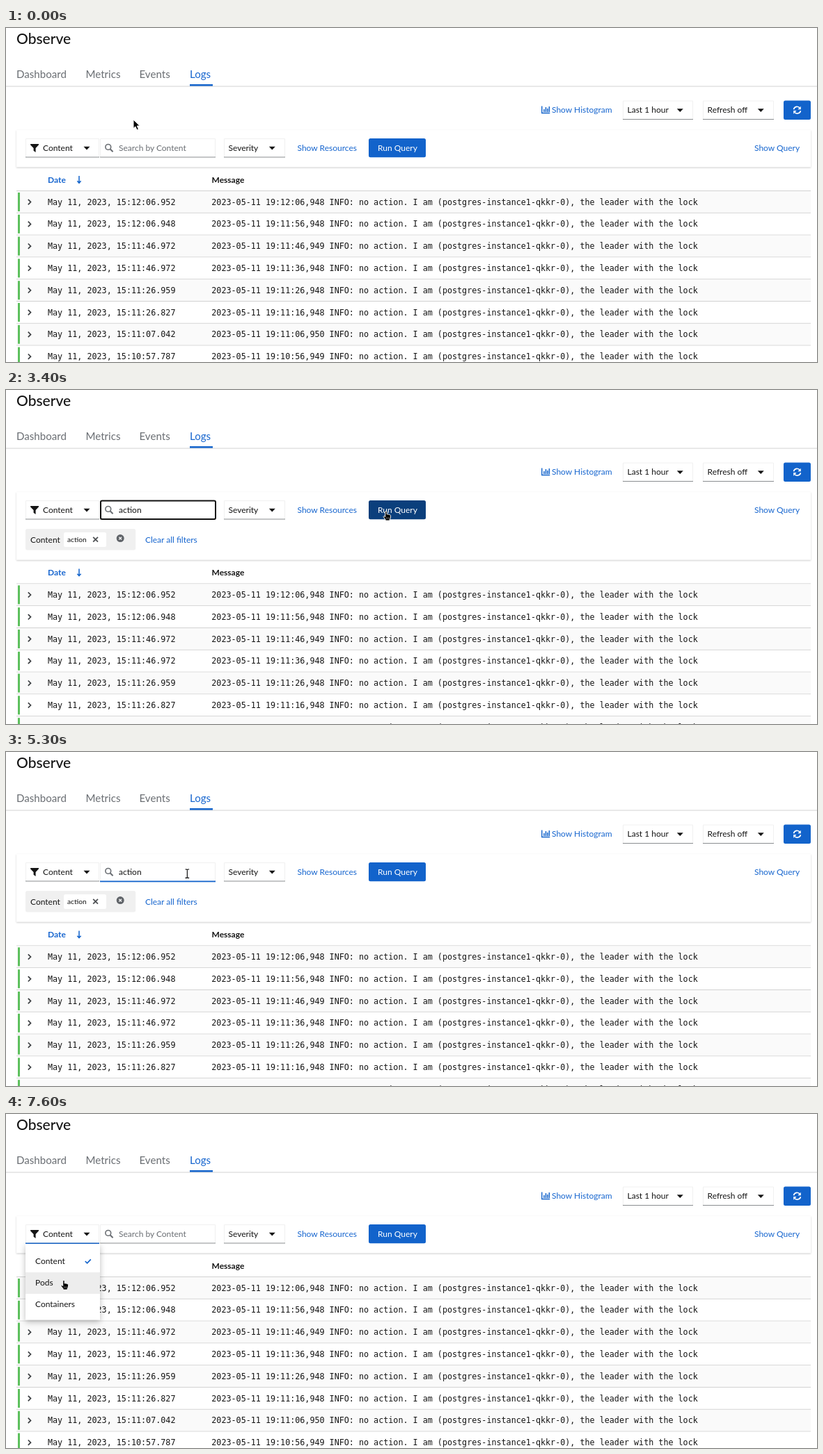
Write an HTML page that moves like this. It is 1165 px wide and 481 px high and loops after 8 s.

```html
<!DOCTYPE html>
<html lang="en">
<head>
<meta charset="utf-8">
<title>Observe logs</title>
<style>
  html, body { margin: 0; width: 100%; height: 100%; overflow: hidden; background: #fff; }
  svg { display: block; }
  text { font: 12px Lato, "Open Sans", sans-serif; fill: #151515; white-space: pre; }
  .mono { font: 11.73px "DejaVu Sans Mono", monospace; }
  .blue { fill: #1766cf; }
  .grey { fill: #6a6e73; }
  .white { fill: #fff; }
  .bold { font-weight: 700; }
  .small { font-size: 10.2px; }
  .tab { font-size: 15.1px; }
  .title { font-size: 21px; font-weight: 500; }
  .hover { fill: #0b3f7c; text-decoration: underline; }
  .panel { filter: drop-shadow(0 1px 1px #0003); }
  .menu { filter: drop-shadow(0 3px 4px #0004); }
</style>
</head>
<body>
<svg id="stage" width="1165" height="481"></svg>
<script>
const stage = document.getElementById('stage');
const pen = document.createElement('canvas').getContext('2d');
const LOOP = 8000, STEP = 100, ROW = 31.8;
const BLUE = '#1263cb', NAVY = '#0b3f7c';

// [date column time, message time]
const logs = [
  ['12:06.952', '12:06,948'], ['12:06.948', '11:56,948'],
  ['11:46.972', '11:46,949'], ['11:46.972', '11:36,948'],
  ['11:26.959', '11:26,948'], ['11:26.827', '11:16,948'],
  ['11:07.042', '11:06,950'], ['10:57.787', '10:56,949'],
];

// Pointer keys: time, x, y
const path = [
  [0, 183, 132], [700, 198, 163], [3000, 198, 163], [3300, 500, 171],
  [3400, 546, 175], [3700, 561, 173], [4800, 561, 173], [5000, 265, 163],
  [5100, 265, 163], [6000, 244, 218], [6100, 244, 218], [6600, 107, 173],
  [7000, 107, 173], [7600, 83, 240],
];

// Search text: time, value
const typing = [[0, ''], [1200, 'a'], [1300, 'ac'], [1500, 'act'], [1900, 'acti'],
  [2100, 'actio'], [2300, 'action'], [6200, '']];

const latest = (keys, t) => keys.filter(k => k[0] <= t).pop();
const within = (t, a, b) => t >= a && t < b;

function pointerAt(t) {
  const a = latest(path, t), b = path[path.indexOf(a) + 1];
  if (!b) return [a[1], a[2]];
  const k = (t - a[0]) / (b[0] - a[0]);
  return [a[1] + (b[1] - a[1]) * k, a[2] + (b[2] - a[2]) * k];
}

const rect = (x, y, w, h, fill, more = '') =>
  `<rect x="${x}" y="${y}" width="${w}" height="${h}" fill="${fill}" ${more}/>`;
const text = (x, y, s, cls = '') => `<text x="${x}" y="${y}" class="${cls}">${s}</text>`;
const line = (d, color, w = 1, more = '') =>
  `<path d="${d}" fill="none" stroke="${color}" stroke-width="${w}" ${more}/>`;
const shape = (d, fill = '#151515', more = '') => `<path d="${d}" fill="${fill}" ${more}/>`;
const move = (x, y, s) => `<g transform="translate(${x} ${y})">${s}</g>`;

const field = (x, y, w, base = '#8a8d90') =>
  line(`M${x + .5} ${y + 27}V${y + .5}H${x + w - .5}V${y + 27}`, '#f0f0f0') +
  rect(x, y + 26.5, w, base === BLUE ? 1.8 : 1, base);
const caretDown = (x, y) => shape(`M${x - 4.5} ${y - 2}h9l-4.5 4.7z`);
const select = (x, y, w, label, dx = 6.5) =>
  field(x, y, w) + text(x + dx, y + 17.8, label) + caretDown(x + w - 18.7, y + 13.8);
const cross = (x, y, r, color, w) =>
  line(`M${x - r} ${y - r}l${2 * r} ${2 * r}m0 ${-2 * r}l${-2 * r} ${2 * r}`, color, w);

function header() {
  return text(15, 23, 'Observe', 'title') +
    [[15, 'Dashboard'], [114.5, 'Metrics'], [191.5, 'Events']]
      .map(([x, s]) => text(x, 71.5, s, 'tab grey')).join('') +
    text(264, 71.5, 'Logs', 'tab blue') +
    rect(0, 83.5, 1165, 1, '#d2d2d2') + rect(264, 81, 33, 2.5, BLUE);
}

function rightSide() {
  const sync = line('M-5-1A5 5 0 0 1 4-2.7M5 1A5 5 0 0 1-4 2.7', '#fff', 1.6) +
    shape('M5.3-5.5v4.6H.9zM-5.3 5.5V.9h4.4z', '#fff');
  return line('M769.8 112.5v10h11.5', BLUE, 1.4) +
    line('M773 121v-4m2.5 4v-7m2.5 7v-5m2.4 5v-8', BLUE, 1.5) +
    text(784, 122.3, 'Show Histogram', 'blue') +
    select(886, 104.5, 101, 'Last 1 hour') + select(1001, 104.5, 102, 'Refresh off') +
    rect(1117, 104.5, 39, 27.5, BLUE, 'rx="2.5"') + move(1136.5, 118.2, sync) +
    text(1075, 176.8, 'Show Query', 'blue');
}

function toolbar(s) {
  const [x, y] = s.pointer;
  let out = field(28, 159, 106, s.menu ? BLUE : undefined) +
    shape('M35.5 167h11.3q.8.7 0 1.5l-4.2 4.5v6l-3-2.2v-3.8l-4.4-4.5q-.6-.9.3-1.5z') +
    text(53, 176.8, 'Content') + caretDown(116, 172.8);
  const overSearch = s.kind === 'beam' && !s.focus;
  out += field(135, 159, 166, overSearch ? BLUE : undefined);
  if (s.focus) out += rect(136, 159.5, 165, 26.5, '#fff', 'stroke="#101010" stroke-width="2" rx="2"');
  out += `<circle cx="146.8" cy="171.4" r="3.9" fill="none" stroke="#6a6e73" stroke-width="1.6"/>` +
    line('M149.6 174.2l4 4', '#6a6e73', 2) +
    (s.typed ? text(162, 176.8, s.typed) : text(162, 176.8, 'Search by Content', 'grey'));
  if (s.caret) {
    pen.font = '12px Lato, "Open Sans", sans-serif';
    out += rect(Math.round(162 + pen.measureText(s.typed).width), 165, 1, 15, '#000');
  }
  return out + select(313, 159, 88, 'Severity') +
    text(418.5, 176.8, 'Show Resources', 'blue') +
    rect(521, 159, 82, 27.3, s.pressed ? NAVY : BLUE, 'rx="2.5"') +
    text(534, 176.8, 'Run Query', 'white');
}

function chips(s) {
  const d = s.chip === 'action' ? 13.6 : 0;
  return rect(28, 200, 144.6 + d, 30.5, '#f0f0f0', 'rx="2.5"') + text(35, 219.5, 'Content') +
    rect(83, 205, 47.5 + d, 21, '#fff', 'rx="2.5"') + text(88, 219.3, s.chip, 'small') +
    cross(115 + d, 215.3, 3.4, '#4f5255', 1.8) +
    `<circle cx="${150.6 + d}" cy="213.6" r="5.5" fill="#5f6368"/>` +
    cross(150.6 + d, 213.6, 1.9, '#f0f0f0', 1.5) +
    text(186.3 + d, 219.5, 'Clear all filters', s.overClear ? 'hover' : 'blue');
}

function table(s, width) {
  let out = text(60, 222.6, 'Date', 'bold blue') +
    line('M105 213v10.3m-2.6-3l2.6 3l2.6-3', BLUE, 1.5) +
    text(295.5, 222.6, 'Message', 'bold') + rect(15, 234, width, 1, '#d2d2d2');
  if (s.loading) return out;
  logs.forEach(([date, stamp], i) => {
    const row = rect(15, .8, width, ROW - .8, i % 2 ? '#fff' : '#fafafa') +
      rect(15, ROW - .3, width, 1, '#d2d2d2') + rect(17, 2.7, 3, 27, '#5dc05d') +
      line('M31.8 12.6l3.7 3.7l-3.7 3.7', '#3c3f42', 1.7) +
      text(60, 20.3, 'May 11, 2023, 15:' + date, 'mono') +
      text(295.3, 20.3, `2023-05-11 19:${stamp} INFO: no action. I am ` +
        '(postgres-instance1-qkkr-0), the leader with the lock', 'mono');
    out += move(0, 234.3 + i * ROW, row);
  });
  return out;
}

function menu(s) {
  const [x, y] = s.pointer;
  const hot = y >= 197 ? Math.floor((y - 197) / 31) : -1;
  return rect(28, 187, 107, 109.5, '#fff', 'class="menu"') +
    (hot >= 0 ? rect(28, 197 + hot * 31, 107, 31, '#ededed') : '') +
    ['Content', 'Pods', 'Containers'].map((n, i) => text(42, 216.3 + i * 31, n)).join('') +
    line('M113.8 212l2.8 2.8l5.2-5.4', BLUE, 1.7);
}

const edge = 'stroke="#fff" stroke-width="1" stroke-linejoin="round"';
const cursors = {
  arrow: shape('M0 0v12.6l2.9-2.7l2.1 4.9l2.4-1l-2.1-4.8h4z', '#000', edge),
  beam: line('M-2.8-6.2h2l.8.8l.8-.8h2M0-5.4V5.4M-2.8 6.2h2l.8-.8l.8.8h2', '#fff', 2.4) +
    line('M-2.8-6.2h2l.8.8l.8-.8h2M0-5.4V5.4M-2.8 6.2h2l.8-.8l.8.8h2', '#000', 1.1),
  hand: shape('M-1.3 0q1.3-1.3 2.5 0v4l1.6-.2l1.6.5l1.5.7q.8.4.7 1.6l-.5 3.3l-.9 1.6v1.6' +
    'h-6.2v-1.5l-2.4-3.2q-1-1.4.2-1.8q.9-.1 1.9 1z', '#000', edge) +
    line('M.5 8.3v2.6M2.3 8.3v2.6M4 8.3v2.6', '#aaa', .6),
};

// Clickable areas: left, top, right, bottom
const hotspots = [[28, 159, 134, 186], [313, 159, 401, 186], [418, 165, 504, 182],
  [521, 159, 603, 186]];
const inside = ([x, y], [l, t, r, b]) => x >= l && x <= r && y >= t && y <= b;

function scene(t) {
  const s = { pointer: pointerAt(t) };
  s.typed = latest(typing, t)[1];
  s.chip = within(t, 2000, 2800) ? 'act' : within(t, 2800, 6200) ? 'action' : '';
  s.focus = within(t, 700, 3600);
  s.caret = within(t, 700, 2900);
  s.loading = within(t, 3600, 4100);
  s.pressed = within(t, 3400, 5200);
  s.menu = t >= 6800;
  s.overClear = s.chip && inside(s.pointer, [200, 209, 274, 224]);
  const onHand = s.overClear || hotspots.some(h => inside(s.pointer, h)) ||
    s.menu && inside(s.pointer, [28, 187, 135, 297]);
  s.kind = inside(s.pointer, [135, 159, 301, 186]) ? 'beam' : onHand ? 'hand' : 'arrow';

  const extra = s.loading ? 9 : 0, width = 1141 + extra, drop = s.chip ? 44.4 : 0;
  return header() + rect(15, 147, width, 53.3 + drop, '#fff', 'class="panel"') +
    move(extra, 0, rightSide()) + toolbar(s) + (s.chip ? chips(s) : '') +
    move(0, drop, table(s, width)) + (s.menu ? menu(s) : '') +
    move(...s.pointer, cursors[s.kind]);
}

let shown = -1;
function frame(now) {
  const t = Math.floor(now % LOOP / STEP) * STEP;
  if (t !== shown) stage.innerHTML = scene(shown = t);
  requestAnimationFrame(frame);
}
frame(performance.now());
</script>
</body>
</html>
```
